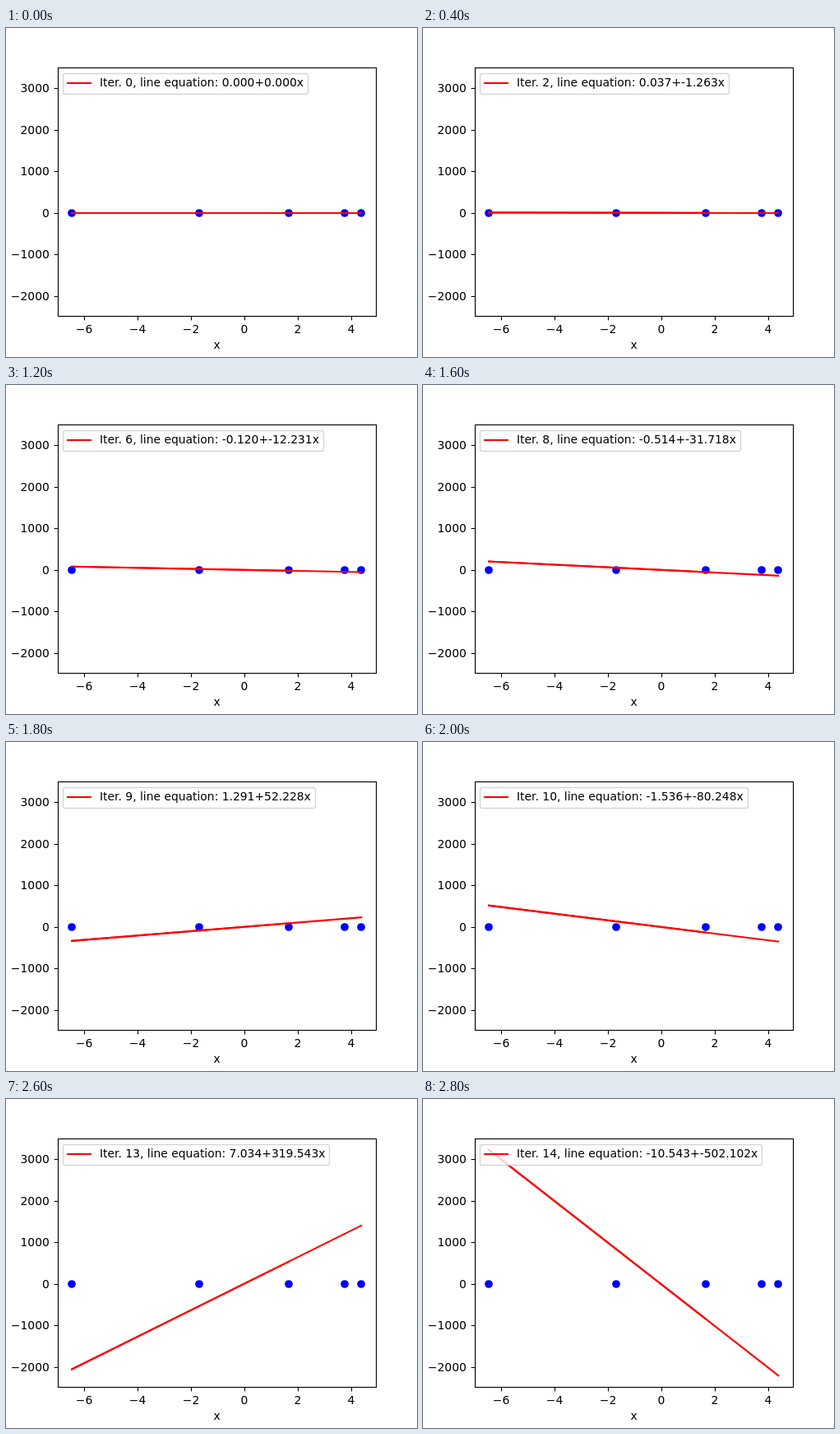
Write an HTML page with a canvas that moves like this. It is 500x400 px and loops after 3000 ms.

```html
<!DOCTYPE html>
<html lang="en">
<head>
<meta charset="utf-8">
<title>Diverging gradient descent</title>
<style>
  html, body { margin: 0; width: 100%; height: 100%; overflow: hidden; background: #fff; }
  canvas { display: block; }
</style>
</head>
<body>
<canvas id="plot" width="500" height="400"></canvas>
<script>
const ctx = document.getElementById('plot').getContext('2d');
const STEP_MS = 200, STEPS = 15;
const POINTS = [-6.46, -1.68, 1.67, 3.76, 4.38];
const LINE_WIDTH = 2.083, FRAME_WIDTH = 1.111;

const toX = x => 290 + x * 32.49;
const toY = y => 224.8 - y * 0.05044;
const snap = v => Math.floor(v + 0.5) + 0.5;

// Each parameter has one oscillating, growing mode and one decaying mode.
const GROWTH = -Math.sqrt(2.490423), DECAY = Math.sqrt(0.7076);
function parameters(n) {
  const grow = GROWTH ** n - 1, decay = DECAY ** n - 1;
  return {
    intercept: -0.018112 * grow - 0.2196 * decay,
    slope: -0.846463 * grow + 0.00456 * decay
  };
}

function segment(x1, y1, x2, y2, color, width, cap = 'butt') {
  ctx.strokeStyle = color;
  ctx.lineWidth = width;
  ctx.lineCap = cap;
  ctx.beginPath();
  ctx.moveTo(x1, y1);
  ctx.lineTo(x2, y2);
  ctx.stroke();
}

function text(label, x, y, align) {
  ctx.fillStyle = '#000';
  ctx.textAlign = align;
  ctx.fillText(label, x, y);
}

function drawPoints() {
  ctx.fillStyle = '#00f';
  for (const x of POINTS) {
    ctx.beginPath();
    ctx.arc(Math.round(toX(x)), 225, 4.86, 0, 2 * Math.PI);
    ctx.fill();
  }
}

// The line runs left from the third point, then back across the whole range.
function drawFit({ intercept, slope }) {
  const place = x => slope === 0
    ? [Math.round(toX(x)), 225]
    : [toX(x), toY(intercept + slope * x)];
  const [left, , middle, , right] = POINTS.map(place);
  segment(...middle, ...left, '#f00', LINE_WIDTH, 'square');
  segment(...left, ...right, '#f00', LINE_WIDTH, 'square');
}

function drawAxes() {
  const name = v => String(v).replace('-', '\u2212');
  for (let v = -6; v <= 4; v += 2) {
    const x = snap(toX(v));
    segment(x, 350.5, x, 355.4, '#000', FRAME_WIDTH);
    text(name(v), toX(v), 371, 'center');
  }
  for (let v = -2000; v <= 3000; v += 1000) {
    const y = snap(toY(v));
    segment(58.6, y, 63.5, y, '#000', FRAME_WIDTH);
    text(name(v), 52.8, Math.round(toY(v) + 5), 'right');
  }
  text('x', 256.5, 390, 'center');
  ctx.lineWidth = FRAME_WIDTH;
  ctx.strokeStyle = '#000';
  ctx.strokeRect(63.5, 48.5, 387, 302);
}

function drawLegend(n, { intercept, slope }) {
  const label = `Iter. ${n}, line equation: ${intercept.toFixed(3)}+${slope.toFixed(3)}x`;
  const right = snap(113.9 + ctx.measureText(label).width + 5);
  ctx.beginPath();
  ctx.roundRect(69.5, 55.5, right - 69.5, 25, 2.8);
  ctx.fillStyle = 'rgba(255,255,255,0.8)';
  ctx.fill();
  ctx.lineWidth = 1.389;
  ctx.strokeStyle = 'rgba(204,204,204,0.8)';
  ctx.stroke();
  segment(75, 67, 103, 67, '#f00', LINE_WIDTH, 'square');
  text(label, 114, 71, 'left');
}

function draw(time) {
  const n = Math.floor(time / STEP_MS) % STEPS;
  const fit = parameters(n);
  ctx.fillStyle = '#fff';
  ctx.fillRect(0, 0, 500, 400);
  ctx.font = '13.889px "DejaVu Sans", sans-serif';
  drawPoints();
  drawFit(fit);
  drawAxes();
  drawLegend(n, fit);
}

function tick(time) {
  draw(time);
  requestAnimationFrame(tick);
}
draw(0);
requestAnimationFrame(tick);
</script>
</body>
</html>
```
